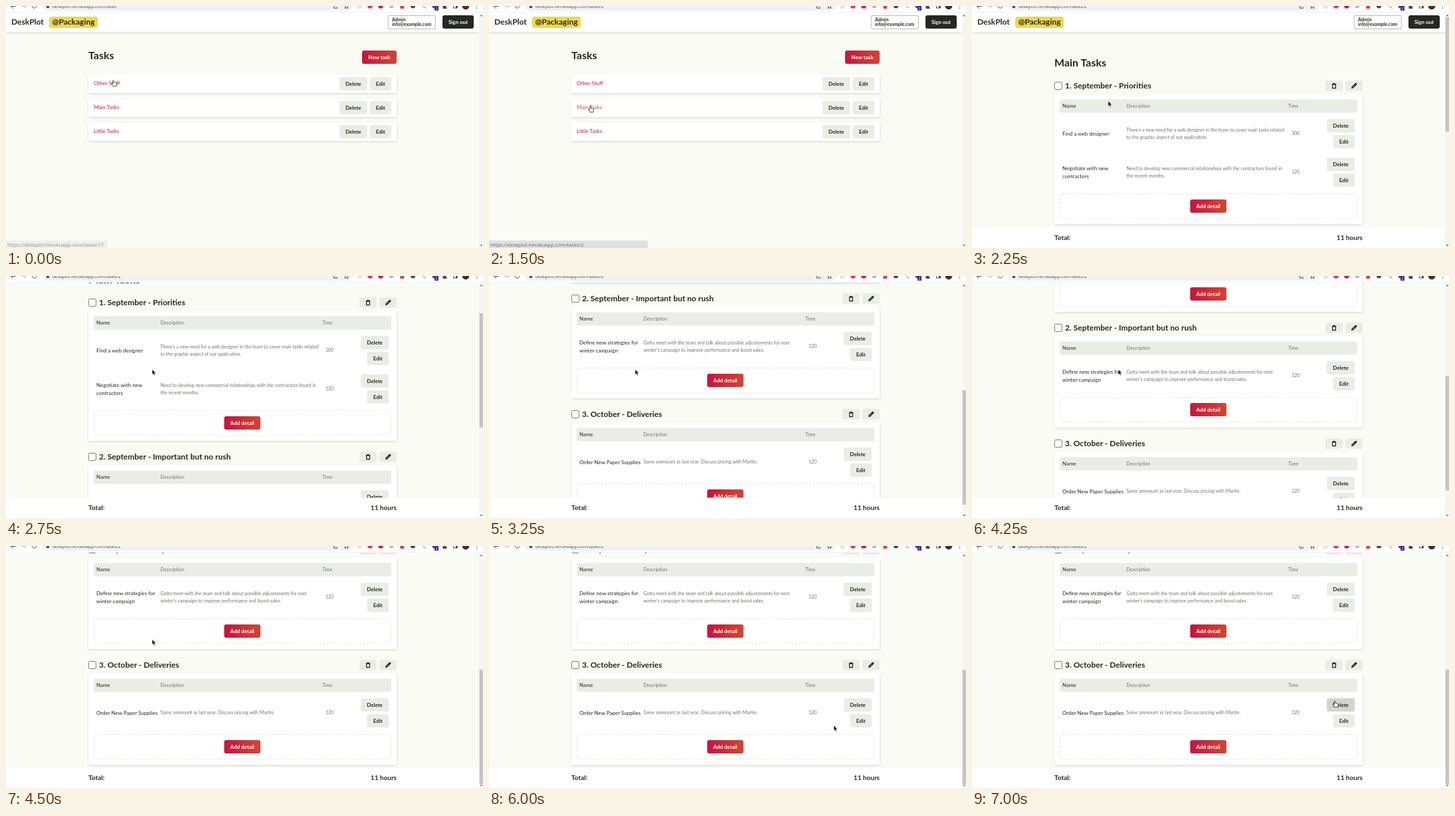
Write an HTML page that moves like this. It is 718 px wide and 364 px high and loops after 8 s.

```html
<!DOCTYPE html>
<html lang="en">
<head>
<meta charset="utf-8">
<title>Task list</title>
<style>
html, body { margin: 0; width: 100%; height: 100%; overflow: hidden; background: #fafbf4; }
svg { display: block; width: 718px; height: 364px; font: 8px Lato, sans-serif; fill: #262822; }
text { white-space: pre; }
.b { font-weight: 700; }
.h1 { font-size: 16px; font-weight: 700; }
.h2 { font-size: 12px; font-weight: 700; }
.sum { font-size: 10px; font-weight: 700; }
.s { font-size: 7px; }
.desc { font-size: 7px; fill: #72736e; }
.ui { font-family: "Open Sans", "Noto Sans", sans-serif; }
.card { fill: #fff; filter: url(#soft); }
.btn { fill: #eaece6; }
.btn.hover { fill: #d3d4cf; }
.main { fill: url(#red); }
.link { fill: #c0163f; }
.link.hover { fill: #cb4a31; }
.dash { fill: none; stroke: #e2e4dc; stroke-width: .9; stroke-dasharray: 3.5 2; }
.ink { fill: none; stroke: #4a4d51; stroke-width: 1; }
</style>
</head>
<body>
<svg id="stage" viewBox="0 0 718 364" xmlns="http://www.w3.org/2000/svg"></svg>
<script>
const STEP = 250, LOOP = 8000, MAX_SCROLL = 347;
const HOST = 'deskplot.herokuapp.com';

const rect = (x, y, w, h, attrs = '', r = 0) =>
  `<rect x="${x}" y="${y}" width="${w}" height="${h}" rx="${r}" ${attrs}/>`;
const text = (x, y, str, cls = '', attrs = '') =>
  `<text x="${x}" y="${y}" class="${cls}" ${attrs}>${str}</text>`;
const path = (d, attrs = 'class="ink"') => `<path d="${d}" ${attrs}/>`;
const dot = (x, y, r, color) => `<circle cx="${x}" cy="${y}" r="${r}" fill="${color}"/>`;
const middle = 'text-anchor="middle"';

function button(x, y, w, label, cls = 'btn', id = '') {
  const color = cls === 'btn' ? '' : 'fill="#fff"';
  return rect(x, y, w, 20, `class="${cls}" ${id && `id="${id}"`}`, 3) +
    text(x + w / 2, y + 12.6, label, 'b', `${middle} ${color}`);
}

function pageHeader() {
  return rect(0, 5, 712, 34, 'class="card"') +
    text(8, 27.8, 'DeskPlot', 'h2') +
    rect(65, 16, 73, 17, 'fill="#eed84e"', 4) +
    text(101.5, 28, '@Packaging', 'h2', middle) +
    rect(575.3, 14.5, 71, 20, 'fill="none" stroke="#55574f" stroke-width=".7" stroke-dasharray="1.6 1.2"', 1) +
    text(581, 23.4, 'Admin', 's b') +
    text(581, 29.9, 'info@example.com', 's b') +
    rect(657, 14, 47, 20, 'fill="#262822"', 3) +
    text(680.5, 26.8, 'Sign out', 'b', `${middle} fill="#fff"`);
}

function listPage() {
  const rows = ['Other Stuff', 'Main Tasks', 'Little Tasks'].map((name, i) => {
    const y = 103 + 36 * i;
    return rect(124, y, 464, 28, 'class="card"', 3) +
      text(132, y + 16.4, name, 'link', `id="link${i}"`) +
      button(502, y + 4, 41.5, 'Delete') + button(547.5, y + 4, 32.5, 'Edit');
  });
  return pageHeader() + text(124, 80.3, 'Tasks', 'h1') +
    button(536, 67, 52, 'New task', 'main') + rows.join('');
}

const trash = (x, y) => path(
  `M${x - 3.3} ${y - 2.3}h6.6M${x - 1.1} ${y - 2.6}v-1h2.2v1M${x - 2.3} ${y - 2}v5.5h4.6v-5.5`,
  'fill="none" stroke="#1c1d19" stroke-width="1.2"');
const pencil = (x, y) =>
  path(`M${x - 4} ${y + 4}l.6-2.9 4.9-4.9 2.3 2.3 -4.9 4.9z`, 'fill="#1c1d19"') +
  path(`M${x + 2} ${y - 4.2}q.7-.6 1.4 0l.8.8q.6.7 0 1.4l-.5.5 -2.2-2.2z`, 'fill="#1c1d19"') +
  path(`M${x - 2.2} ${y + 2.2}l3.6-3.6`, 'stroke="#eaece6" stroke-width=".7"');

function lines(x, y, gap, rows, cls) {
  return rows.map((row, i) => text(x, y + (i - (rows.length - 1) / 2) * gap, row, cls)).join('');
}

function tableRow(y, [name, desc, time], tag) {
  return lines(136, y + 2.8, 12, name, '') +
    lines(232.5, y + 2.3, 10.7, desc, 'desc') +
    text(487, y + 2.2, time, 'desc', middle) +
    button(534, y - 22, 42, 'Delete', 'btn', tag && tag + 'Delete') +
    button(543.5, y + 2, 32.5, 'Edit', 'btn', tag && tag + 'Edit');
}

function section(y, title, rows, tag) {
  const extra = 58 * (rows.length - 1), foot = y + 104.5 + extra;
  return rect(124.5, y - 5.5, 11, 11, 'fill="#fff" stroke="#70726c" stroke-width=".9"', 1.3) +
    text(140, y + 3.6, title, 'h2') +
    rect(532, y - 7.7, 26, 15.5, 'class="btn"', 3) + trash(545, y + .2) +
    rect(562, y - 7.7, 26, 15.5, 'class="btn"', 3) + pencil(575, y + .2) +
    rect(124, y + 12.6, 464, 137.5 + extra, 'class="card"', 3) +
    rect(132, y + 20.4, 448, 20, 'class="btn"', 3) +
    text(136, y + 33.2, 'Name') +
    text(232.5, y + 32.7, 'Description', 'desc') +
    text(476, y + 32.7, 'Time', 'desc') +
    rows.map((row, i) => tableRow(y + 72 + 58 * i, row, tag)).join('') +
    rect(132.5, foot, 447, 37.3, 'class="dash"', 3) +
    button(328.4, foot + 8.5, 54.6, 'Add detail', 'main');
}

function detailPage() {
  return pageHeader() + text(124, 91, 'Main Tasks', 'h1') +
    section(120, '1. September - Priorities', [
      [['Find a web designer'],
        ["There's a new need for a web designer in the team to cover main tasks related",
          'to the graphic aspect of our application.'], 300],
      [['Negotiate with new', 'contractors'],
        ['Need to develop new commercial relationships with the contractors found in',
          'the recent months.'], 120]]) +
    section(352, '2. September - Important but no rush', [
      [['Define new strategies for', 'winter campaign'],
        ['Gotta meet with the team and talk about possible adjustements for next',
          "winter's campaign to improve performance and boost sales."], 120]]) +
    section(526, '3. October - Deliveries', [
      [['Order New Paper Supplies'],
        ['Same ammount as last year. Discuss pricing with Martin.'], 120]], 'last');
}

function browserBar() {
  return rect(0, 0, 718, 10, 'fill="#fff"') +
    rect(0, 9.5, 718, .5, 'fill="#e6e7e5"') +
    rect(55, -8, 467, 15.3, 'fill="#eff1f2"', 7.6) +
    path('M14.5 .5h-7M10.5 -2.8l-3.2 3.3 3.2 3.3') +
    path('M23 .5h7M27 -2.8l3.2 3.3 -3.2 3.3', 'fill="none" stroke="#b9bbbd"') +
    path('M39.6 -1.5a3.3 3.3 0 1 0 6 0') +
    rect(60.8, -1, 4.2, 4, 'fill="#4a4d51"', .5) +
    text(70, 3, '', 'ui', 'id="url" font-size="6.7" fill="#45484b"') +
    path('M493.5 0v3.2h5v-1.5M496 1q1-2 3.5-2') +
    path('M512.5-3l1 2.3 2.4.2-1.8 1.6.6 2.5-2.2-1.3-2.2 1.3.6-2.5-1.8-1.6 2.4-.2z') +
    rect(528.5, -3, 7, 7, 'fill="#e3e4e4"', 1) +
    dot(548, 0, 3.8, '#d9365c') + dot(564, 0, 3.8, '#d6164b') +
    dot(580, 0, 3.2, '#b5b7b8') + rect(593.3, -3, 6, 7, 'fill="#d8453a"', 1) +
    dot(612.5, 0, 3.5, '#45484c') +
    path('M625.5-2l5 5M630.5 1l2 3', 'fill="none" stroke="#b5b7b8" stroke-width="1.3"') +
    dot(645, 0, 3.5, '#56449c') + rect(645, 0, 6, 7, 'fill="#3c2c92"', 1) +
    text(648, 5.6, '2', 'ui', `${middle} font-size="5" fill="#fff"`) +
    path('M657.5-2h2a1 1 0 0 1 2 0h2v2a1 1 0 0 0 0 2v2h-6z', 'fill="#45484c"') +
    path('M673.5-3h6v6h-6z') + rect(677, -3, 2.5, 6, 'fill="#4a4d51"') +
    dot(692, 0, 5.3, '#4a2b28') +
    dot(708.5, 0, .8, '#45484c') + dot(708.5, 3, .8, '#45484c');
}

const stage = document.getElementById('stage');
stage.innerHTML = `
  <defs>
    <linearGradient id="red"><stop stop-color="#c6143f"/><stop offset="1" stop-color="#d24632"/></linearGradient>
    <filter id="soft" x="-5%" y="-30%" width="110%" height="180%">
      <feDropShadow dx=".4" dy="1.3" stdDeviation="1.5" flood-color="#000" flood-opacity=".13"/>
    </filter>
  </defs>
  ${rect(0, 0, 718, 364, 'fill="#fafbf4"')}
  <g id="list">${listPage()}</g>
  <g id="detail">${detailPage()}</g>
  <g id="footer">
    ${rect(0, 333.5, 712, 36, 'class="card"')}
    ${text(124, 352, 'Total:', 'sum')}
    ${text(588, 352, '11 hours', 'sum', 'text-anchor="end"')}
  </g>
  ${rect(712, 10, 6, 354, 'fill="#f5f6f4"')}
  ${path('M713.4 15.3h4l-2-2.6zM713.4 359h4l-2 2.6z', 'fill="#777"')}
  ${rect(712.7, 17, 5.3, 172, 'id="thumb" fill="#c3c4c3"')}
  ${browserBar()}
  <g id="status">
    ${rect(-3, 352.7, 0, 15, 'id="statusBox"', 2)}
    ${text(2, 361.8, '', 'ui', 'id="statusText" font-size="7.5"')}
  </g>
  <g id="arrow">${path('M0 0v8l1.9-1.7 1.3 2.9 1.3-.6-1.3-2.8h2.6z', 'fill="#111" stroke="#fff" stroke-width=".5"')}</g>
  <g id="hand">${path('M-.8 .8q.8-1.5 1.6 0v2.5q.9-.7 1.6.2 1-.6 1.5.4 1.2-.3 1.2 1v1.7l-.9 2.7h-4.4l-2.7-3.6q-.2-1.3 1-.8l1.1 1z', 'fill="#fff" stroke="#111" stroke-width=".75" stroke-linejoin="round"')}</g>`;

const el = id => document.getElementById(id);
const show = (id, on) => el(id).setAttribute('display', on ? 'inline' : 'none');
const hover = (id, on) => el(id).classList.toggle('hover', on);

// Last entry [time, ...values] that has begun.
const at = (keys, t) => keys.filter(k => k[0] <= t).pop();

const pointer = [
  [0, 161.5, 111.5, 'hand'], [250, 161.5, 112.5, 'hand'], [500, 160, 118, 'hand'],
  [750, 157, 132, 'arrow'], [1000, 154, 146, 'hand'], [1250, 153, 149, 'hand'],
  [1500, 152.5, 150.5, 'hand'], [2000, 168, 149, 'arrow'], [2250, 205, 143, 'arrow'],
  [2500, 220, 140.5, 'arrow'], [5250, 300, 190, 'arrow'], [5500, 396.5, 257.5, 'arrow'],
  [6000, 519, 270, 'arrow'], [6250, 540, 268, 'arrow'], [6500, 552, 259, 'hand'],
  [6750, 548, 241, 'hand'], [7000, 546, 233, 'hand']];
const scrolls = [
  [0, 0], [2500, 14], [2750, 80], [3000, 200], [3250, 318], [3500, 250],
  [3750, 180], [4000, 212], [4250, 274], [4500, MAX_SCROLL]];
const statuses = [
  [0, '/tasks/17', 153, '#eff0ec', '#8d8f8e'], [250, '/tasks/17', 153, '#e9ebeb', '#6c6f71'],
  [750, '/tasks/17', 153, '#eff0ec', '#8d8f8e'], [1000, '/tasks/2', 153, '#e9ebeb', '#6c6f71'],
  [1500, '/tasks/2', 239, '#dee1e4', '#65686b'], [1750, ''],
  [6500, '/tasks/2/edit', 170, '#e9ebeb', '#6c6f71'], [6750, '']];

function draw(time) {
  const t = Math.floor(time % LOOP / STEP) * STEP;
  const inDetail = t >= 1750;
  const [, scroll] = at(scrolls, t);
  show('list', !inDetail);
  for (const id of ['detail', 'footer', 'thumb']) show(id, inDetail);
  el('detail').setAttribute('transform', `translate(0 ${-scroll})`);
  el('thumb').setAttribute('y', 17 + .487 * scroll);
  el('url').textContent = HOST + (t < 1500 ? '/tasks' : '/tasks/2');

  const [, route, width, fill, color] = at(statuses, t);
  show('status', route);
  if (route) {
    el('statusBox').setAttribute('width', width + 3);
    el('statusBox').setAttribute('fill', fill);
    el('statusText').setAttribute('fill', color);
    el('statusText').textContent = 'https://' + HOST + route;
  }

  hover('link0', t >= 250 && t < 750);
  hover('link1', t >= 1000);
  hover('lastEdit', t === 6500);
  hover('lastDelete', t >= 6750);

  const [, x, y, kind] = at(pointer, t);
  for (const id of ['arrow', 'hand']) show(id, id === kind);
  el(kind).setAttribute('transform', `translate(${x} ${y})`);
}

const start = performance.now();
function tick() {
  draw(performance.now() - start);
  requestAnimationFrame(tick);
}
tick();
</script>
</body>
</html>
```
